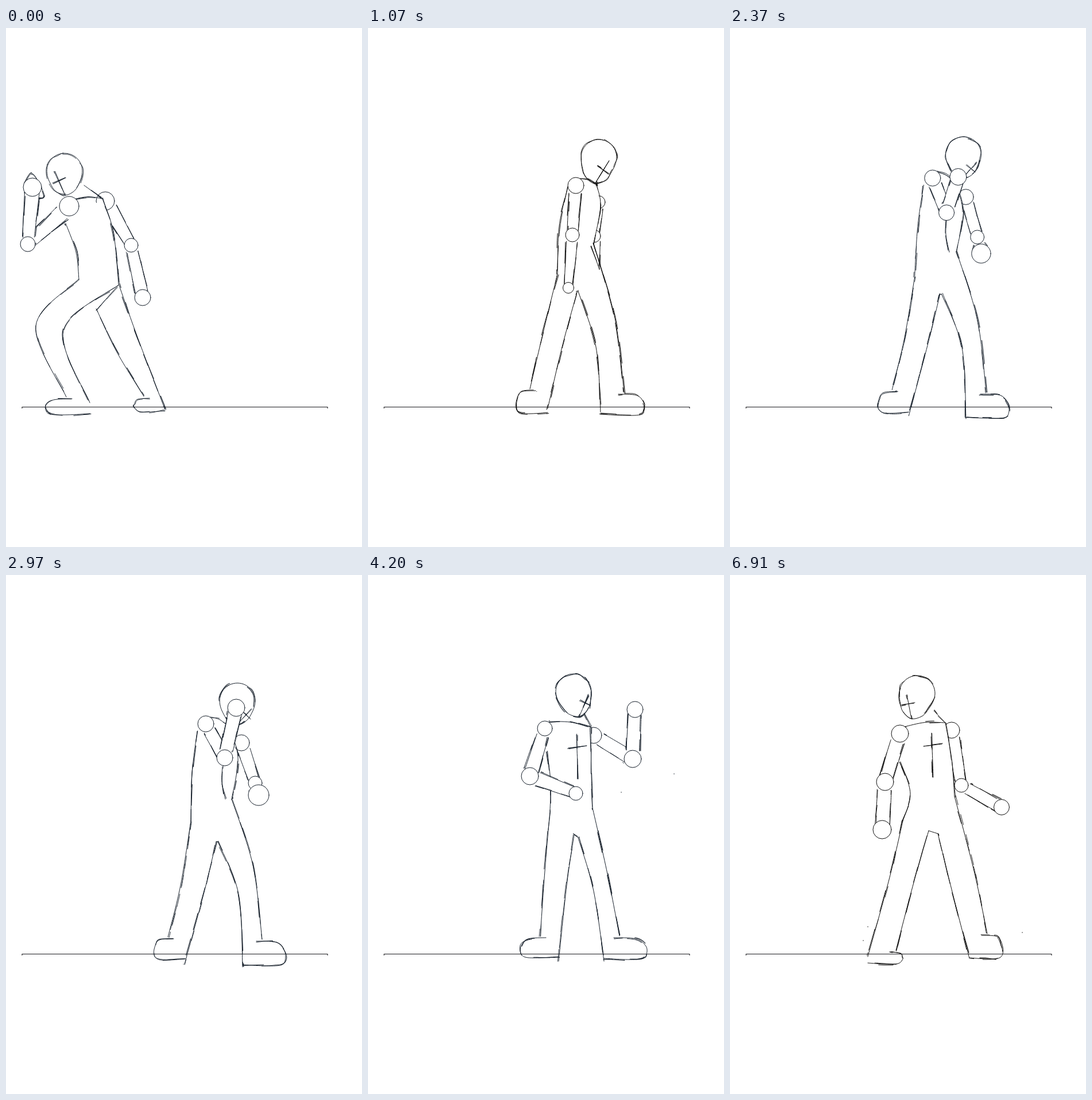
An HTML page that plays this animation: 620 by 903 pixels, repeating every 7.01 s.

```html
<!DOCTYPE html>
<html lang="en">
<head>
<meta charset="utf-8">
<title>Sketch figure</title>
<style>
html, body { margin: 0; width: 100%; height: 100%; overflow: hidden; background: #fff; }
svg { display: block; width: 100%; height: 100%; }
</style>
</head>
<body>
<svg viewBox="0 0 620 903">
  <path d="M28 662V659.5H560V662" fill="none" stroke="#1c1c20" stroke-width="1.1"/>
  <g id="figure" fill="none" stroke-linecap="round" stroke-linejoin="round"></g>
</svg>
<script>
const LOOP = 7010;
const BLUE = '#17202b', BLACK = '#111';

// Chest guide lines, drawn where the body faces the viewer.
const cross = (x, y) => [[x - 2, y - 22, x + 1, y + 55], [x - 16, y + 1, x + 16, y - 3]];

// Key points. head: centre, chin. Arms: x, y, radius of shoulder, elbow, hand.
// Legs: outer knee, ankle; inner start, knee, ankle. feet: toe x, sole y for each side.
const lunge = {
  ink: BLUE, marks: [[33, 270, 47, 254, 67, 292, 53, 297]],
  head: [102, 249, 103, 291], look: [92, 265],
  armL: [110, 310, 17, 38, 376, 13, 46, 277, 16], armR: [173, 301, 16, 218, 378, 12, 238, 469, 14],
  back: [104, 340, 122, 390, 127, 438], front: [168, 297, 187, 355, 196, 445],
  legL: [52, 518, 105, 642], inL: [196, 447, 100, 526, 146, 652],
  legR: [229, 538, 277, 664], inR: [158, 490, 192, 562, 240, 641], feet: [68, 672, 222, 667]
};
const slump = {
  ink: BLACK, marks: [],
  head: [402, 225, 395, 271], look: [410, 247],
  armL: [362, 274, 14, 356, 360, 12, 349, 452, 9.5], armR: [402, 303, 11, 394, 362, 11, 403, 420, 0],
  back: [348, 277, 333, 345, 330, 428], front: [398, 273, 405, 310, 393, 375],
  legL: [305, 530, 282, 628], inL: [364, 460, 338, 555, 313, 662],
  legR: [430, 505, 446, 634], inR: [366, 458, 397, 555, 405, 668], feet: [257, 670, 482, 673]
};
const lean = {
  ...slump, marks: [[583, 632], [394, 460]],
  head: [426, 228, 412, 274], look: [431, 252],
  armL: [380, 273, 14, 355, 340, 11, 377, 418, 12], armR: [415, 305, 10, 412, 374, 11.5, 423, 446, 9],
  back: [362, 280, 343, 350, 319, 467], front: [415, 276, 420, 318, 402, 380],
  legL: [303, 535, 284, 626], legR: [435, 522, 447, 633]
};
const guard = {
  ink: BLUE, marks: [[377, 333, 376, 360, 382, 390]],
  head: [403, 219, 403, 260], look: [418, 243],
  armL: [348, 259, 14, 381, 318, 14, 401, 231, 15], armR: [410, 292, 14, 434, 362, 12, 440, 383, 18],
  back: [333, 272, 324, 345, 322, 428], front: [388, 264, 404, 318, 393, 390],
  legL: [304, 540, 282, 630], inL: [366, 464, 345, 552, 311, 677],
  legR: [430, 505, 446, 634], inR: [369, 464, 405, 555, 412, 682], feet: [257, 669, 487, 679]
};
const stand = {
  ink: BLUE, marks: [...cross(365, 300), [533, 346], [441, 378]],
  head: [358, 203, 368, 246], look: [378, 223],
  armL: [308, 267, 13, 282, 350, 15, 362, 380, 12], armR: [393, 279, 14, 461, 320, 15, 465, 234, 14],
  back: [312, 308, 318, 360, 317, 410], front: [388, 265, 389, 345, 391, 405],
  legL: [308, 515, 300, 628], inL: [359, 452, 346, 540, 332, 672],
  legR: [417, 520, 438, 628], inR: [366, 457, 393, 550, 411, 672], feet: [265, 665, 486, 668]
};
const ready = {
  ink: BLACK, marks: [...cross(353, 297), [240, 612], [232, 636], [509, 622]],
  head: [326, 206, 316, 250], look: [311, 224],
  armL: [296, 276, 15, 270, 360, 15, 265, 443, 16], armR: [386, 270, 14, 403, 366, 12, 473, 404, 13.5],
  back: [297, 325, 314, 380, 301, 428], front: [375, 257, 386, 320, 391, 385],
  legL: [277, 530, 240, 664], inL: [346, 445, 320, 535, 289, 653],
  legR: [425, 515, 448, 624], inR: [362, 450, 388, 555, 417, 667], feet: [302, 676, 476, 667]
};

function mix(a, b, w) {
  const near = w < .5 ? a : b;
  const p = { ink: near.ink, marks: Math.min(w, 1 - w) < .18 ? near.marks : [] };
  for (const k in a) if (!(k in p)) p[k] = a[k].map((v, i) => v + (b[k][i] - v) * w);
  return p;
}

function shift(a, dx, dy) {
  const move = (list, step) => list.map((v, i) => v + [dx, dy, 0][i % step]);
  const p = { ink: a.ink, marks: a.marks.map(m => move(m, 2)) };
  for (const k in a) if (!(k in p)) p[k] = move(a[k], k.startsWith('arm') ? 3 : 2);
  return p;
}

// Replace the elbow and hand of one arm.
const reach = (p, side, elbow, hand) =>
  ({ ...p, [side]: [...p[side].slice(0, 3), ...elbow, 15, ...hand, 14] });

const settle = reach(reach(shift(stand, -5, 2), 'armL', [277, 350], [357, 349]), 'armR', [455, 312], [443, 227]);
const rise = reach(shift(stand, 3, -3), 'armR', [471, 320], [479, 234]);
const swing = reach(shift(stand, 0, -2), 'armL', [250, 340], [238, 420]);
const { back, front, legL, legR, inL, inR, feet, marks } = shift(settle, 2, 7);
const turn = { ...mix(settle, ready, .5), back, front, legL, legR, inL, inR, feet, marks };

const keys = [
  [0, lunge], [420, shift(stand, -1, 6)], [870, shift(slump, -2, -1)], [1070, slump],
  [1770, lean], [2370, mix(lean, guard, .85)], [2970, guard], [3170, shift(rise, 0, 1)],
  [3270, rise], [3600, rise], [3900, swing], [4200, stand],
  [4970, shift(mix(stand, settle, .6), -7, 1)], [5870, settle], [6640, turn], [6910, ready]
];

const run = (from, to, n) => Array.from({ length: n }, (_, i) => from + (to - from) * i / (n - 1));
const steps = [0, ...run(70, 770, 9), ...run(870, 3270, 25), ...run(3700, 4200, 6), 4970, 5870, 6640, 6910];

function poseAt(t) {
  let i = keys.length - 1;
  while (keys[i][0] > t) i--;
  const [t0, a] = keys[i];
  if (t === t0) return a;
  const [t1, b] = keys[i + 1];
  return mix(a, b, (t - t0) / (t1 - t0));
}

let seed = 1;
const rand = () => (seed = seed * 16807 % 2147483647) / 2147483647;
const jitter = (pts, amount) => pts.map(v => v + (rand() - .5) * amount);

// Smooth curve through flat x, y pairs.
function curve(pts, closed) {
  const n = pts.length / 2;
  const at = i => {
    i = closed ? (i + n) % n : Math.max(0, Math.min(n - 1, i));
    return [pts[2 * i], pts[2 * i + 1]];
  };
  let d = 'M' + at(0);
  for (let i = 0; i < n - (closed ? 0 : 1); i++) {
    const [p, q, r, s] = [at(i - 1), at(i), at(i + 1), at(i + 2)];
    const c1 = q.map((v, j) => v + (r[j] - p[j]) / 6);
    const c2 = r.map((v, j) => v - (s[j] - q[j]) / 6);
    d += `C${c1} ${c2} ${r}`;
  }
  return d;
}

const path = (d, attrs) => `<path d="${d}" ${attrs}/>`;
const blank = pts => path('M' + pts.join(' ') + 'Z', 'fill="#fff" stroke="none"');

// One firm stroke and two broken passes beside it.
function sketch(pts, closed) {
  let out = path(curve(pts, closed), 'stroke-width="1"');
  for (let i = 0; i < 2; i++) {
    const dash = `${15 + rand() * 30} ${12 + rand() * 30}`;
    out += path(curve(jitter(pts, 4), closed),
      `stroke-width="${.8 + rand() * .4}" stroke-dasharray="${dash}" stroke-dashoffset="${rand() * 50}"`);
  }
  return out;
}

const disc = (x, y, r) => r < 2 ? '' :
  `<circle cx="${x}" cy="${y}" r="${r}" fill="#fff" stroke-width="1"/>`;

// Two rails between a pair of joints, narrower than the joints.
function limb(x1, y1, r1, x2, y2, r2) {
  const len = Math.hypot(x2 - x1, y2 - y1) || 1;
  const [ux, uy] = [(x2 - x1) / len, (y2 - y1) / len];
  const rail = side => [
    x1 + ux * r1 - uy * r1 * side, y1 + uy * r1 + ux * r1 * side,
    x2 - ux * r2 * .6 - uy * r2 * side, y2 - uy * r2 * .6 + ux * r2 * side
  ];
  const [a, b] = [rail(.8), rail(-.8)];
  return blank([...a, b[2], b[3], b[0], b[1]]) + sketch(a) + sketch(b);
}

function arm(j) {
  return limb(...j.slice(0, 6)) + limb(...j.slice(3)) +
    [0, 3, 6].map(k => disc(...j.slice(k, k + 3))).join('');
}

// A circle drawn out to a point at the chin.
function head([x, y, chinX, chinY]) {
  const chin = Math.atan2(chinY - y, chinX - x);
  const drop = Math.hypot(chinX - x, chinY - y) - 31;
  const pts = [];
  for (let i = 0; i < 14; i++) {
    const a = i / 14 * Math.PI * 2;
    const r = 31 + drop * Math.max(0, Math.cos(a)) ** 4;
    pts.push(x + r * Math.cos(a + chin), y + r * Math.sin(a + chin));
  }
  return sketch(pts, true);
}

function face([, , chinX, chinY], [x, y]) {
  const [dx, dy] = [(x - chinX) * .6, (y - chinY) * .6];
  return sketch([x + dx, y + dy, chinX, chinY]) +
    sketch([x + dy * .7, y - dx * .7, x - dy * .7, y + dx * .7]);
}

// The ankle nearer the toe carries the instep; the sole runs back to the other.
function foot(outer, inner, toe, sole) {
  const dir = Math.sign(toe - (outer[0] + inner[0]) / 2) || 1;
  const [a, b] = (outer[0] - inner[0]) * dir > 0 ? [outer, inner] : [inner, outer];
  const top = a[1] + 3;
  return sketch([
    a[0] - dir * 10, top, a[0] + (toe - a[0]) * .6, top + 2, toe - dir * 2, top + (sole - top) * .4,
    toe - dir, sole - 8, toe - dir * 9, sole, (toe + b[0]) / 2, sole + 1, b[0], sole - 1
  ]);
}

function shoulders({ armL: [x, y], front: [fx, fy], head: [hx, hy] }) {
  const reachIn = 42 / Math.hypot(fx - hx, fy - hy);
  return sketch([x + 8, y - 12, (x + 8 + fx) / 2, (y - 12 + fy) / 2 - 4, fx, fy]) +
    sketch([hx + (fx - hx) * reachIn, hy + (fy - hy) * reachIn, fx, fy]);
}

function leg(hip, outer, inner, toe, sole) {
  return sketch([...hip.slice(-2), ...outer]) + sketch(inner) +
    foot(outer.slice(-2), inner.slice(-2), toe, sole);
}

function torso({ back, front: [x1, y1, x2, y2, x3, y3] }) {
  return blank([...back, x3, y3, x2, y2, x1, y1]) + sketch(back) + sketch([x1, y1, x2, y2, x3, y3]);
}

const mark = m => m.length === 2 ? path(`M${m}h.1`, 'stroke-width="1.4"') : sketch(m);

const figure = document.getElementById('figure');

function draw(step) {
  const p = poseAt(steps[step]);
  seed = 977 + step * 131;
  figure.setAttribute('stroke', p.ink);
  figure.innerHTML = arm(p.armR) + torso(p) +
    leg(p.front, p.legR, p.inR, p.feet[2], p.feet[3]) +
    leg(p.back, p.legL, p.inL, p.feet[0], p.feet[1]) +
    sketch([...p.inL.slice(0, 2), ...p.inR.slice(0, 2)]) +
    shoulders(p) + head(p.head) + face(p.head, p.look) +
    p.marks.map(mark).join('') + arm(p.armL);
}

let shown = -1;
function tick() {
  const t = performance.now() % LOOP;
  let step = steps.length - 1;
  while (steps[step] > t) step--;
  if (step !== shown) draw(shown = step);
  requestAnimationFrame(tick);
}
tick();
</script>
</body>
</html>
```
